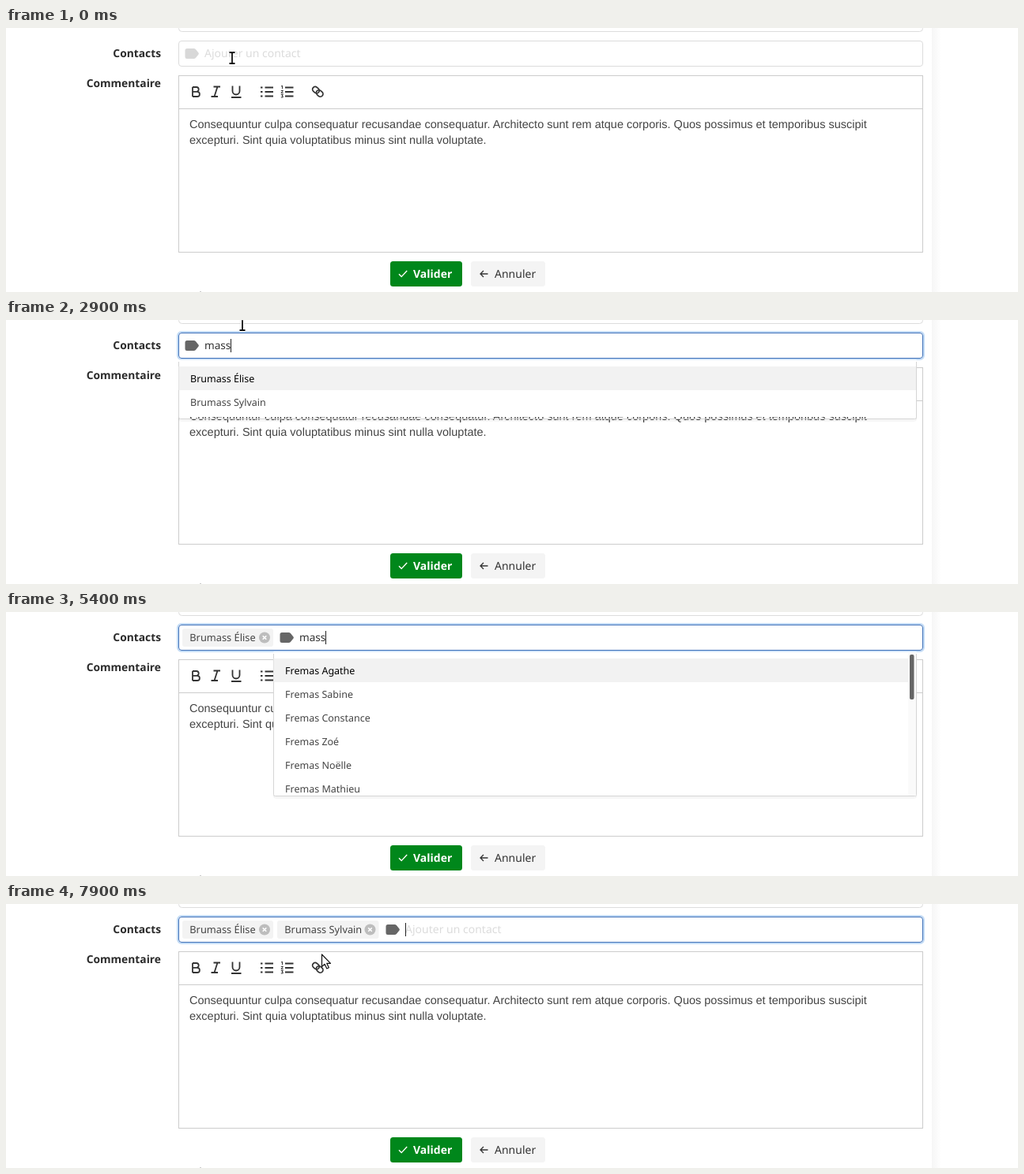
Recreate the animation shown at these times as an HTML page. Size 1280 px wide and 335 px high, loop 8000 ms.

```html
<!DOCTYPE html>
<html lang="fr">
<head>
<meta charset="utf-8">
<title>Contacts</title>
<style>
html, body { margin: 0; width: 100%; height: 100%; overflow: hidden; background: #fff; }
svg { display: block; width: 1280px; height: 335px; }
text { font-family: "Noto Sans", "Open Sans", sans-serif; font-size: 14px; fill: #333; text-rendering: geometricPrecision; white-space: pre; }
.label { font-weight: 700; font-size: 13.8px; text-anchor: end; fill: #2b2b2b; }
.body { font-family: "Liberation Sans", Arial, sans-serif; font-size: 14.5px; fill: #444; }
.item { font-size: 12.5px; fill: #444; }
.chip text { font-size: 12.8px; fill: #444; }
.hint { fill: #dcdcdc; }
.query { font-size: 13.6px; }
.ico { fill: none; stroke: #333; stroke-width: 1.8; }
</style>
</head>
<body>
<svg viewBox="0 0 1280 335">
  <defs>
    <linearGradient id="side"><stop stop-color="#f6f6f6"/><stop offset="1" stop-color="#fff"/></linearGradient>
    <clipPath id="tall"><rect x="218" y="51" width="934" height="182"/></clipPath>
  </defs>
  <rect width="1280" height="335" fill="#fff"/>
  <rect x="1171" width="12" height="335" fill="url(#side)"/>
  <rect id="upper" x="218.5" y="-30.5" width="941" height="35" rx="4" fill="none"/>
  <text class="label" x="196" y="36.8">Contacts</text>
  <text class="label" x="196" y="74.8">Commentaire</text>
  <path d="M245 334.5h2" stroke="#ccc"/>

  <rect x="218.5" y="60.5" width="941" height="224" fill="#fff" stroke="#ccc"/>
  <path d="M218 102.5h942" stroke="#ccc"/>
  <g class="ico">
    <path d="M236 75v12M236 75h4.8a2.9 2.9 0 0 1 0 5.8h-4.8M240 80.8h1.8a3.1 3.1 0 0 1 0 6.2H236"/>
    <path d="M262.5 74.5h8.5M259.5 87h8.5M267.5 74.5l-4 12.5"/>
    <path d="M286.5 73.5v6.5a4.5 4.5 0 0 0 9 0v-6.5M285 88h12.5"/>
    <path id="bullets" d="M327.5 75.5h10.5M327.5 81h10.5M327.5 86.5h10.5M322 75.5h2.5M322 81h2.5M322 86.5h2.5"/>
    <path d="M353 75.5h10.5M353 81h10.5M353 86.5h10.5"/>
    <path stroke-width="1" d="M348 74l1.5-.8v4M347.800 79.5h2.700l-2.500 3h2.700M347.800 84.5h2.700l-1.500 1.700q2 .2 1.200 1.800h-2.400"/>
    <g transform="translate(394.3 80.8) rotate(42)" stroke-width="1.7">
      <rect x="-7.8" y="-3.4" width="9.2" height="6.8" rx="3.4"/>
      <rect x="-1.4" y="-3.4" width="9.2" height="6.8" rx="3.4"/>
    </g>
  </g>
  <text class="body" x="232" y="126.5">Consequuntur culpa consequatur recusandae consequatur. Architecto sunt rem atque corporis. Quos possimus et temporibus suscipit</text>
  <text class="body" x="232" y="147.2">excepturi. Sint quia voluptatibus minus sint nulla voluptate.</text>

  <rect x="486" y="296" width="91" height="32" rx="3.5" fill="#00871b"/>
  <path d="M497 312.3l3.2 3.3 7-7.6" fill="none" stroke="#fff" stroke-width="1.4"/>
  <text x="515" y="316.7" style="fill:#fff;font-weight:700">Valider</text>
  <rect x="588" y="296" width="94" height="32" rx="3.5" fill="#f4f4f4"/>
  <path d="M609.5 312h-9.5M604 308l-4 4 4 4" fill="none" stroke="#333" stroke-width="1.3"/>
  <text x="618" y="316.7" style="font-weight:500">Annuler</text>

  <rect id="glow" x="217" y="15" width="944" height="35" rx="5" fill="none" stroke="#c3dcf6" stroke-width="2"/>
  <rect id="field" x="218.5" y="16.5" width="941" height="32" rx="3.5" fill="#fff"/>
  <g id="chips"></g>
  <g id="entry">
    <path id="tag" d="M226.5 28.5a2.5 2.5 0 0 1 2.5-2.5h8.5q1.5 0 2.4 1.1l3.6 4.4q.8 1 0 2l-3.6 4.4q-.9 1.1-2.4 1.1h-8.5a2.5 2.5 0 0 1-2.500-2.500z"/>
    <text id="hint" class="hint" x="251" y="36.8">Ajouter un contact</text>
    <text id="query" class="query" x="251" y="36.8"></text>
    <path id="caret" d="M.5 24v17" stroke="#222"/>
  </g>
  <g id="menu"></g>
  <g id="cursor">
    <g id="beam" fill="none">
      <path d="M-3.5-7h2.500l1 1 1-1h2.500M0-6V6M-3.500 7h2.500l1-1 1 1h2.500" stroke="#fff" stroke-width="3.8"/>
      <path d="M-3.5-7h2.500l1 1 1-1h2.500M0-6V6M-3.500 7h2.500l1-1 1 1h2.500" stroke="#111" stroke-width="1.8"/>
    </g>
    <path id="hand" d="M-1.5 6.5V1.2a1.500 1.500 0 0 1 3 0V4.500q1.300-.9 2.500.2 1.300-.8 2.400.3 2.100-.5 2.100 1.500v4q0 2-1.300 3v1.500H-1v-1.500l-3.500-4.700q-.7-1.700 1-1.700z" fill="#fff" stroke="#111" stroke-width="1.3" stroke-linejoin="round"/>
    <path id="arrow" d="M.5.5v15.500l3.600-3.200 2.700 5.700 2.600-1.200-2.700-5.500h4.800z" fill="#fff" stroke="#111" stroke-width="1.2" stroke-linejoin="round"/>
  </g>
</svg>
<script>
const NS = "http://www.w3.org/2000/svg";
const $ = id => document.getElementById(id);
const LOOP = 8000;

function add(parent, tag, attrs, text) {
  const el = document.createElementNS(NS, tag);
  for (const k in attrs) el.setAttribute(k, attrs[k]);
  if (text) el.textContent = text;
  return parent.appendChild(el);
}
const show = (el, on) => el.setAttribute("visibility", on ? "visible" : "hidden");
const between = (t, a, b) => t >= a && t < b;

// last value whose start time has passed
function at(track, t) {
  let v = track[0][1];
  for (const [start, value] of track) if (t >= start) v = value;
  return v;
}

const people = ["Brumass Élise", "Brumass Sylvain"];
const lists = {
  broad: ["Korvitt Anna", "Korvitt Dominique", "Maltu Lise", "Vormane Augustin", "Fremas Agathe", "Peurnal Cécile"],
  close: ["Agathe", "Sabine", "Constance", "Zoé", "Noëlle", "Mathieu"].map(n => "Fremas " + n),
  exact: people
};

const typed = [[0, ""], [1500, "m"], [1700, "ma"], [1900, "mas"], [2000, "mass"], [3900, ""],
  [5000, "m"], [5100, "ma"], [5200, "mas"], [5300, "mass"], [7400, ""]];
const menuAt = [[0, ""], [1600, "broad"], [2000, "close"], [2100, "exact"], [3900, ""],
  [5200, "broad"], [5400, "close"], [5600, "exact"], [7400, ""]];
const fade = [[0, 1], [1600, .45], [1700, .96], [1800, 1], [5200, .6], [5300, .97], [5400, 1]];
const entryX = [[0, 0], [3900, 120], [7400, 254]];
const caretOn = [[0, 0], [500, 1], [3600, 0], [3900, 1], [4400, 0], [5000, 1], [6300, 0], [7400, 1]];
const tagDark = [[0, 0], [500, 1], [3600, 0], [3900, 1], [7100, 0], [7400, 1]];
const edge = [[0, "#dcdcdc"], [100, "#b5b5b5"], [500, "#7da3d3"], [600, "#3f70b8"]];
const shape = [[0, "beam"], [3200, "hand"], [4100, "arrow"], [4300, "beam"], [5000, ""],
  [6800, "hand"], [7600, "beam"], [7700, "arrow"]];
// time, x, y of the pointer's hot spot
const path = [[0, 286, 38], [700, 286, 38], [900, 291, 36], [1100, 291, 36], [1200, 299, 6], [2900, 299, 6],
  [3400, 331, 97], [3600, 328, 79], [3900, 328, 79], [4400, 424, 104], [6700, 424, 96], [6900, 424, 96],
  [7200, 411, 102], [7500, 411, 102], [7600, 446, 115], [7900, 399, 63.5], [8000, 399, 63.5]];

function pointer(t) {
  const i = path.findIndex(p => p[0] > t);
  const a = path[i - 1], b = path[i];
  const k = (t - a[0]) / (b[0] - a[0]);
  return [a[1] + (b[1] - a[1]) * k, a[2] + (b[2] - a[2]) * k];
}

function makeMenu(names) {
  const g = add($("menu"), "g", {});
  const long = names.length > 2;
  const bottom = long ? 233.5 : 125.5;
  const parts = { g, bases: [], rows: [], texts: [] };
  const base = (tag, attrs) => parts.bases.push(add(g, tag, attrs));
  for (let i = 3; i > 0; i--)
    base("rect", { y: 52, height: bottom - 52 + i, rx: 3, fill: "none", stroke: "#000", "stroke-opacity": .035, "data-right": 1151.5 });
  base("rect", { y: 50.5, height: (long ? 233 : 123) - 50.5, fill: "#fff", "data-right": 1151.5 });
  base("path", { "data-line": bottom, stroke: "#d5d5d5", fill: "none" });
  const inner = add(g, "g", { "clip-path": "url(#tall)" });
  names.forEach((name, i) => {
    const y = 59 + 30 * i;
    if (i < 2) parts.rows.push(add(inner, "rect", { y, height: 30, fill: "#f2f2f2", "data-right": long ? 1141 : 1151 }));
    parts.texts.push(add(inner, "text", { class: "item", y: y + 19.5 }, name));
  });
  if (long) {
    add(g, "rect", { x: 1141, y: 52, width: 10, height: 181, fill: "#fafafa" });
    add(g, "rect", { x: 1143, y: 54, width: 5.5, height: names === lists.close ? 57 : 36.5, rx: 2, fill: "#666" });
  }
  return parts;
}

function placeMenu(m, left, hover) {
  for (const el of [...m.bases, ...m.rows]) {
    const line = el.dataset.line;
    if (line) {
      el.setAttribute("d", `M${left} 53V${line - 2}q0 2 2 2H1149.5q2 0 2-2V53`);
      continue;
    }
    el.setAttribute("x", left);
    el.setAttribute("width", el.dataset.right - left);
  }
  m.texts.forEach((el, i) => {
    el.setAttribute("x", left + 14.5);
    el.style.fill = i === 0 || i === hover ? "#000" : "#444";
  });
  show(m.rows[1], hover === 1);
}

function makeChip(x, right, name) {
  const g = add($("chips"), "g", { class: "chip" });
  const cx = right - 11;
  add(g, "rect", { x, y: 21, width: right - x, height: 23, rx: 3, fill: "#f3f3f3" });
  add(g, "text", { x: x + 9.3, y: 36.8 }, name);
  add(g, "circle", { cx, cy: 32.5, r: 7, fill: "#bdbdbd" });
  add(g, "path", { d: `M${cx - 2.3} 30.2l4.6 4.6m0-4.6l-4.6 4.6`, stroke: "#fff", "stroke-width": 1.6 });
  return g;
}

const menus = {};
for (const k in lists) menus[k] = makeMenu(lists[k]);
const chips = [makeChip(223, 338, people[0]), makeChip(343, 471.5, people[1])];

function draw(now) {
  const t = Math.floor((now % LOOP) / 100) * 100;
  const [x, y] = pointer(t);
  const word = at(typed, t), open = at(menuAt, t), dx = at(entryX, t);

  $("upper").setAttribute("stroke", between(t, 1200, 2900) ? "#b5b5b5" : "#dcdcdc");
  $("field").setAttribute("stroke", at(edge, t));
  $("glow").setAttribute("opacity", t < 500 ? 0 : t < 600 ? .5 : 1);
  $("bullets").style.stroke = between(t, 3900, 4100) ? "#06c" : "#333";

  show(chips[0], t >= 3900);
  show(chips[1], t >= 7400);
  $("entry").setAttribute("transform", `translate(${dx} 0)`);
  $("tag").setAttribute("fill", at(tagDark, t) ? "#666" : "#d8d8d8");
  show($("hint"), !word);
  $("query").textContent = word;
  const end = word ? $("query").getComputedTextLength() : 0;
  $("caret").setAttribute("transform", `translate(${Math.round(251 + end - .3)} 0)`);
  show($("caret"), at(caretOn, t));

  const over = between(t, 3200, 3900) || between(t, 6800, 7400);
  const hover = over && y >= 59 ? Math.floor((y - 59) / 30) : -1;
  for (const k in menus) menus[k].g.style.display = k === open ? "" : "none";
  if (open) {
    placeMenu(menus[open], dx ? 338.5 : 218.5, hover);
    $("menu").setAttribute("opacity", at(fade, t));
  }

  const kind = at(shape, t);
  for (const id of ["beam", "hand", "arrow"]) show($(id), id === kind);
  $("cursor").setAttribute("transform", `translate(${x} ${y})`);
}

const start = performance.now();
function tick() {
  draw(performance.now() - start);
  requestAnimationFrame(tick);
}
tick();
</script>
</body>
</html>
```
